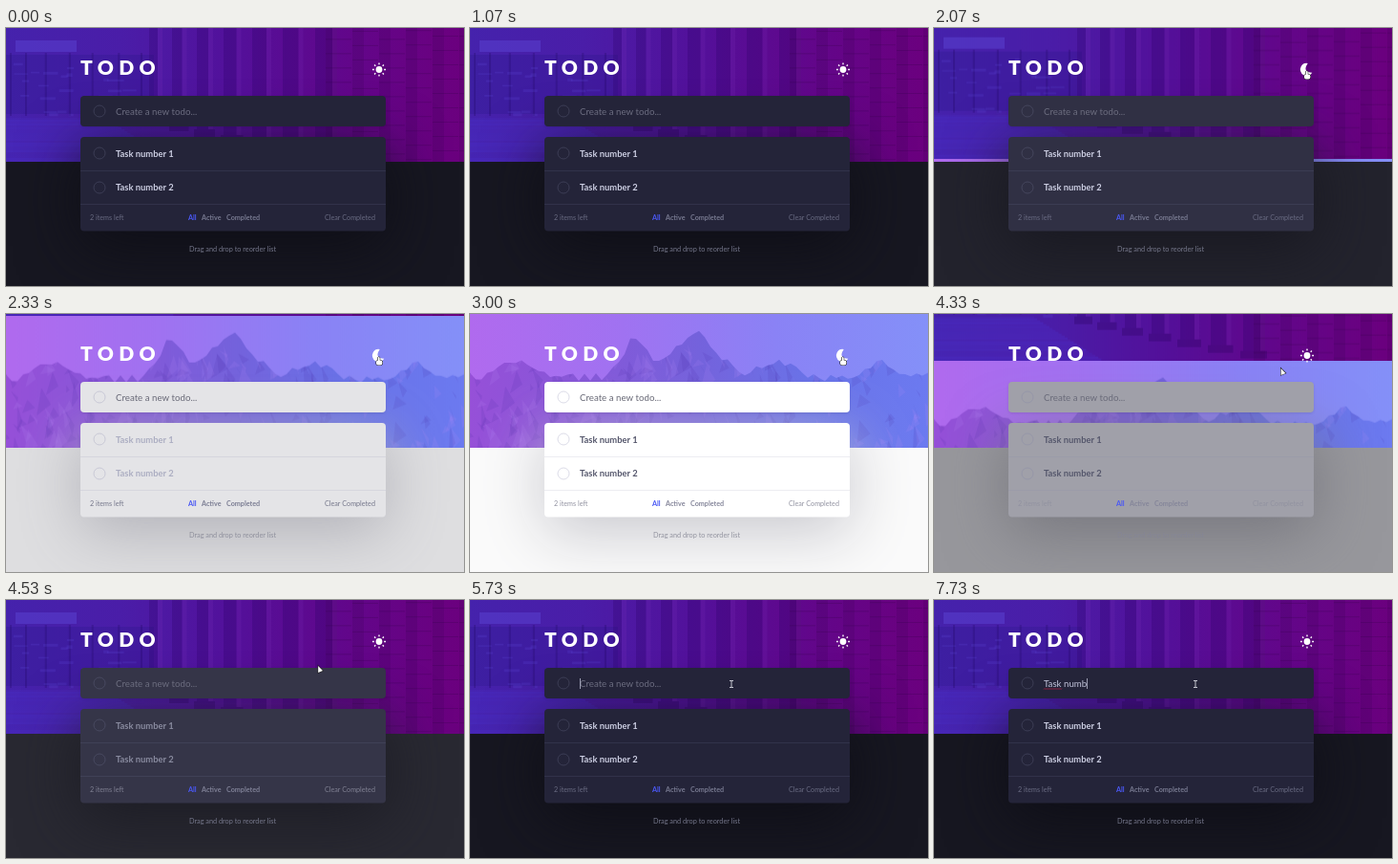
Animation of 480x270 px, one loop 8 s. Source, as an HTML page with a canvas:

```html
<!DOCTYPE html>
<html lang="en">
<head>
<meta charset="utf-8">
<title>Todo</title>
<style>
  html, body { margin: 0; width: 100%; height: 100%; overflow: hidden; background: #171823; }
  canvas { display: block; width: 480px; height: 270px; }
</style>
</head>
<body>
<canvas id="stage" width="480" height="270"></canvas>
<script>
const LOOP = 8000, W = 480, H = 270, HEAD = 140, TURN = Math.PI * 2;
const TO_LIGHT = 2036, TO_DARK = 4200, FOCUS = 5600;
const ctx = document.getElementById('stage').getContext('2d');

const clamp = x => Math.max(0, Math.min(1, x));
const lerp = (a, b, p) => a + (b - a) * p;

function bezier(x1, y1, x2, y2) {
  const at = (a, b, s) => 3 * a * s * (1 - s) ** 2 + 3 * b * s * s * (1 - s) + s ** 3;
  return x => {
    if (x <= 0 || x >= 1) return clamp(x);
    let lo = 0, hi = 1;
    for (let i = 0; i < 24; i++) {
      const mid = (lo + hi) / 2;
      if (at(x1, x2, mid) < x) lo = mid; else hi = mid;
    }
    return at(y1, y2, lo);
  };
}
const ease = bezier(.25, .1, .25, 1);
const easeInOut = bezier(.42, 0, .58, 1);

function random(seed) {
  return () => (seed = (seed * 16807) % 2147483647) / 2147483647;
}

const rgb = hex => [1, 3, 5].map(i => parseInt(hex.slice(i, i + 2), 16));
function mix(dark, light, p) {
  const b = rgb(light);
  return `rgb(${rgb(dark).map((v, i) => Math.round(lerp(v, b[i], p))).join(',')})`;
}

function across(c, ...colors) {
  const g = c.createLinearGradient(0, 0, W, 0);
  colors.forEach((color, i) => g.addColorStop(i / (colors.length - 1), color));
  return g;
}

function banner(paint) {
  const canvas = document.createElement('canvas');
  canvas.width = W;
  canvas.height = HEAD;
  const c = canvas.getContext('2d');
  paint(c, (x, y, w, h, color) => {
    c.fillStyle = color;
    c.fillRect(x, y, w, h);
  });
  return canvas;
}

// Night street with a colonnade
const street = banner((c, box) => {
  const rnd = random(71);
  box(0, 0, W, HEAD, across(c, '#4522ac', '#4a1da8', '#53109a', '#62068a', '#6b007e'));
  box(10, 13, 64, 12, 'rgba(95,75,220,.4)');
  box(0, 28, 155, 62, 'rgba(38,20,130,.25)');
  for (let x = 4; x < 150; x += 16 + rnd() * 14) box(x, 26, 2, 66, 'rgba(32,10,100,.28)');
  for (let i = 0; i < 30; i++)
    box(rnd() * 130, 32 + rnd() * 60, 4 + rnd() * 14, 1 + rnd() * 3, 'rgba(95,75,220,.2)');
  for (let y = 94; y < HEAD; y += 2)
    box(0, y, 105 + (y - 94) * 1.6, 2, `rgba(75,55,215,${.14 + rnd() * .16})`);

  for (let i = 0; i < 7; i++) {
    const x = 150 + i * 23 + i * i, w = 9 + i * 1.5, base = 94 + i * 6;
    box(x, 0, w, base, 'rgba(45,0,105,.28)');
    box(x + w, 0, 5, base, 'rgba(130,50,185,.16)');
    box(x - 3, base, w + 10, 8, 'rgba(40,0,95,.3)');
  }
  for (let x = 335; x < W; x += 28) {
    box(x, 0, 12, HEAD, 'rgba(60,0,85,.2)');
    for (let y = rnd() * 12; y < HEAD; y += 15) box(x, y, 27, 1, 'rgba(55,0,75,.28)');
  }
});

// Mountain range under a bright sky: each peak is [centre, spread, height]
const peaks = [[45, 20, 17], [172, 18, 38], [236, 32, 46], [320, 22, 18], [430, 16, 14]];
const ridge = x => peaks.reduce((y, [at, spread, h]) => y - h * Math.exp(-(((x - at) / spread) ** 2)), 66);

const mountains = banner((c, box) => {
  const rnd = random(29);
  box(0, 0, W, HEAD, across(c, '#b06aee', '#a072f1', '#8a82f5', '#8490f8'));
  c.beginPath();
  c.moveTo(0, HEAD);
  for (let x = 0; x <= W; x += 6) c.lineTo(x, ridge(x) + (rnd() - .5) * 9);
  c.lineTo(W, HEAD);
  c.fillStyle = across(c, '#9650d8', '#8657d8', '#7462dc', '#6872e8', '#6c7af0');
  c.fill();
  c.clip();
  for (let i = 0; i < 260; i++) {
    const x = rnd() * W, y = 16 + rnd() * 124, w = 3 + rnd() * 9, h = 6 + rnd() * 24;
    c.beginPath();
    c.moveTo(x, y);
    c.lineTo(x + w, y + h * .6);
    c.lineTo(x + (rnd() - .5) * 16, y + h);
    c.fillStyle = rnd() < .5 ? 'rgba(70,40,165,.13)' : 'rgba(185,140,248,.13)';
    c.fill();
  }
});

function text(str, x, y, size, weight, color, spacing = 0) {
  ctx.font = `${weight} ${size}px Lato, sans-serif`;
  ctx.letterSpacing = spacing + 'px';
  ctx.fillStyle = color;
  ctx.fillText(str, x, y);
  return ctx.measureText(str).width;
}

function card(y, h, fill, shadow, blur, drop) {
  ctx.save();
  ctx.shadowColor = shadow;
  ctx.shadowBlur = blur;
  ctx.shadowOffsetY = drop;
  ctx.beginPath();
  ctx.roundRect(78, y, 320, h, 4);
  ctx.fillStyle = fill;
  ctx.fill();
  ctx.restore();
}

function ring(y, color) {
  ctx.beginPath();
  ctx.arc(98, y, 6, 0, TURN);
  ctx.strokeStyle = color;
  ctx.lineWidth = 1;
  ctx.stroke();
}

function sun() {
  ctx.fillStyle = ctx.strokeStyle = '#fff';
  ctx.lineWidth = 1.4;
  ctx.beginPath();
  ctx.arc(391, 43.5, 3.4, 0, TURN);
  ctx.fill();
  ctx.beginPath();
  for (let a = 0; a < TURN; a += TURN / 8) {
    ctx.moveTo(391 + Math.cos(a) * 5.2, 43.5 + Math.sin(a) * 5.2);
    ctx.lineTo(391 + Math.cos(a) * 7, 43.5 + Math.sin(a) * 7);
  }
  ctx.stroke();
}

function moon() {
  ctx.beginPath();
  ctx.arc(390.5, 43.5, 6.6, TURN * .08, TURN * .78);
  ctx.quadraticCurveTo(385.5, 46, 396.3, 46.7);
  ctx.fillStyle = '#fff';
  ctx.fill();
}

const pointers = {
  beam() {
    ctx.fillStyle = '#c4c5cf';
    ctx.fillRect(-.5, -3.5, 1, 7);
    ctx.fillRect(-2, -4, 4, 1);
    ctx.fillRect(-2, 3, 4, 1);
  },
  hand() {
    ctx.beginPath();
    ctx.roundRect(-1.2, -4, 1.9, 6, 1);
    ctx.roundRect(-3, -.5, 6.4, 5, 2);
    ctx.stroke();
    ctx.fill();
  },
  arrow() {
    ctx.beginPath();
    ctx.moveTo(0, 0);
    ctx.lineTo(0, 7);
    ctx.lineTo(4.8, 5);
    ctx.closePath();
    ctx.stroke();
    ctx.fill();
  }
};

function drawPointer(t) {
  if (t < 1080) return;
  const arriving = easeInOut(clamp((t - 1080) / 620));
  const leaving = 1 - (1 - clamp((t - TO_DARK) / 830)) ** 1.55;
  const x = lerp(470, 391, arriving) - 117 * leaving;
  const y = lerp(165, 49, arriving) + 39 * leaving ** 1.1;
  const kind = x < 398 && y > 71 ? 'beam' : Math.hypot(x - 391, y - 46) < 9 ? 'hand' : 'arrow';
  ctx.save();
  ctx.translate(x, y);
  ctx.lineWidth = 1.2;
  ctx.strokeStyle = '#222';
  ctx.fillStyle = '#fff';
  pointers[kind]();
  ctx.restore();
}

const phrase = 'Task numb';
const keys = [6300, 6470, 6600, 6800, 6930, 7200, 7270, 7600, 7670];

function drawInput(t, p) {
  const count = keys.filter(k => k <= t).length;
  let end = 114.5;
  if (count) end = 115 + text(phrase.slice(0, count), 115, 90.5, 9.7, 400, '#c3c5dc');
  else text('Create a new todo...', 115, 90.5, 9.7, 400, mix('#6c6d80', '#686976', p));

  if (count > 4) {
    ctx.beginPath();
    for (let x = 115; x <= 134; x++) ctx.lineTo(x, 93 + (x % 2 ? .5 : -.5));
    ctx.strokeStyle = '#b02340';
    ctx.lineWidth = .8;
    ctx.stroke();
  }
  const since = t - Math.max(FOCUS, count ? keys[count - 1] : 0);
  if (since >= 0 && since % 1000 < 500) {
    ctx.fillStyle = '#b9bbd0';
    ctx.fillRect(Math.round(end), 82, .8, 11);
  }
}

function draw(t) {
  const phase = (curve, span, delay = 0) =>
    curve((t - TO_LIGHT - delay) / span) - curve((t - TO_DARK - delay) / span);
  const p = phase(ease, 500);
  const late = phase(ease, 500, 200);
  const slide = phase(easeInOut, 320) * HEAD;

  ctx.fillStyle = mix('#171721', '#fafafa', p);
  ctx.fillRect(0, 0, W, H);
  ctx.save();
  ctx.beginPath();
  ctx.rect(0, 0, W, HEAD);
  ctx.clip();
  ctx.drawImage(street, 0, -slide);
  ctx.drawImage(mountains, 0, HEAD - slide);
  ctx.restore();

  text('TODO', 78, 49.3, 21, 900, '#fff', 5.3);
  if (t >= TO_LIGHT && t < TO_DARK) moon(); else sun();

  const fill = mix('#242439', '#ffffff', p);
  card(114, 98.5, fill, mix('#0e0e16', '#c8c8ce', p), 64, 16);
  card(71, 32, fill, 'rgba(0,0,0,.1)', 3, 1);
  ctx.fillStyle = mix('#31324a', '#ededf2', p);
  ctx.fillRect(78, 149, 320, 1);
  ctx.fillRect(78, 184, 320, 1);
  const border = mix('#3c3d55', '#dcdce8', p);
  [87, 131, 167].forEach(y => ring(y, border));

  drawInput(t, p);
  const ink = mix('#cccee2', '#55576c', late);
  text('Task number 1', 115, 135.3, 9.4, 700, ink);
  text('Task number 2', 115, 170.3, 9.4, 700, ink);

  const muted = mix('#696b82', '#9192a0', late);
  const filter = mix('#777990', '#85869a', late);
  text('2 items left', 88, 200.7, 7.2, 400, muted);
  text('All', 191, 200.7, 7.3, 700, '#4a58f4');
  text('Active', 205, 200.7, 7.2, 700, filter);
  text('Completed', 231, 200.7, 7.2, 700, filter);
  text('Clear Completed', 334, 200.7, 7.2, 400, muted);
  text('Drag and drop to reorder list', 192, 234, 7.3, 400, mix('#74768a', '#92939f', p));

  drawPointer(t);
}

function tick() {
  draw(performance.now() % LOOP);
  requestAnimationFrame(tick);
}
tick();
</script>
</body>
</html>
```
